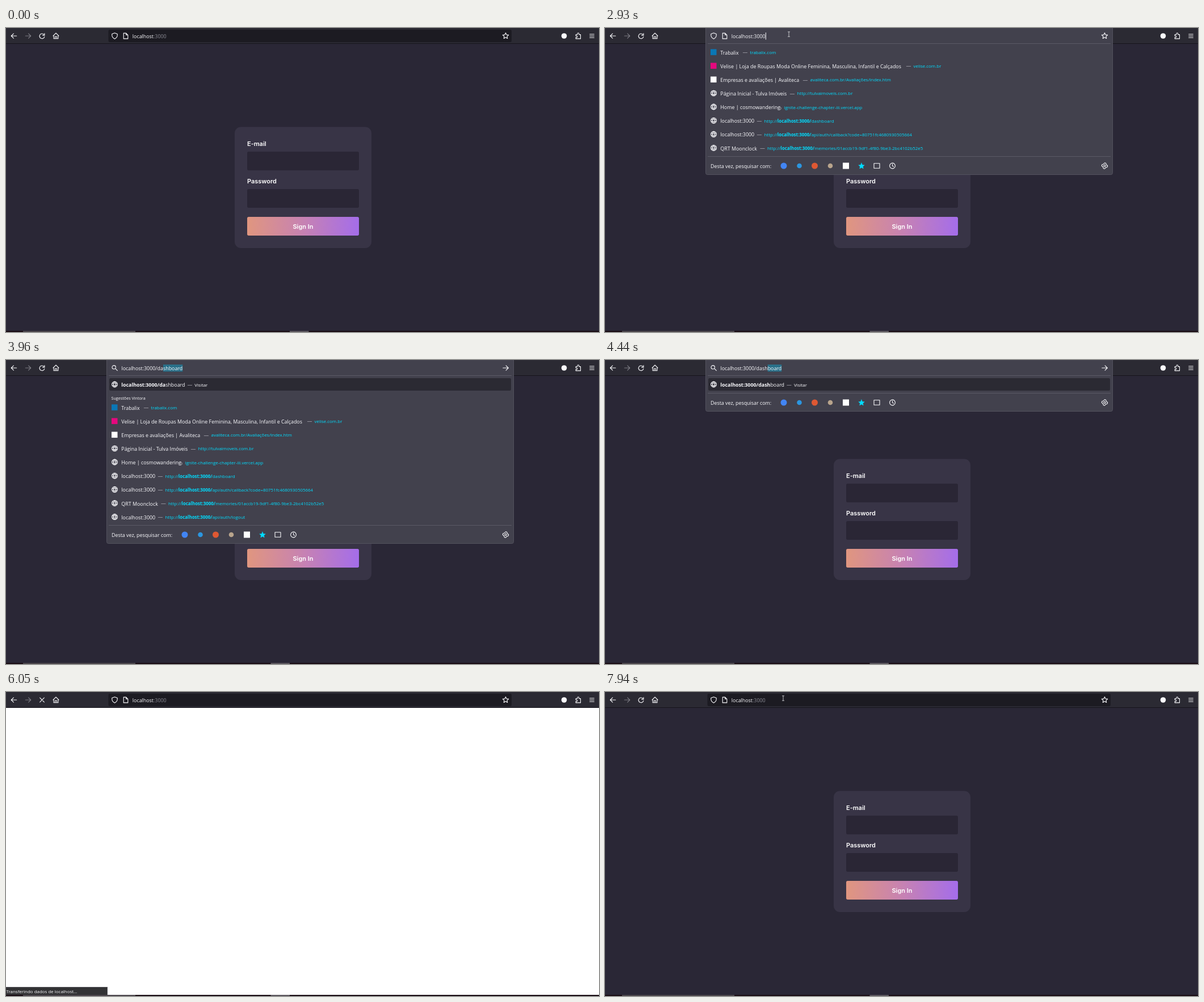
Animation, 1045 px wide and 536 px high, one loop 8000 ms. Source, as an HTML page:

```html
<!DOCTYPE html>
<html lang="pt-BR">
<head>
<meta charset="utf-8">
<title>Sign in</title>
<style>
  html, body { margin: 0; width: 100%; height: 100%; overflow: hidden; background: #2a2736; }
  svg { display: block; }
  text { font: 8.9px "Open Sans", "Noto Sans", sans-serif; fill: #fbfbfe; }
  .small { font-size: 7.95px; }
  .label { font-size: 7.2px; }
  .link { font-size: 7.95px; fill: #00ddff; }
  .dash { fill: #b4b3bb; }
  .dim { fill: #8f8f98; }
  .b { font-weight: 700; }
  .form text { font: 600 10.96px Inter, sans-serif; fill: #fff; }
  .icon { fill: none; stroke: #fbfbfe; stroke-width: 1.1; stroke-linecap: round; stroke-linejoin: round; }
</style>
</head>
<body>
<svg id="stage" width="1045" height="536" viewBox="0 0 1045 536">
  <defs>
    <linearGradient id="warm">
      <stop stop-color="#e0967f"/><stop offset=".5" stop-color="#c782b2"/><stop offset="1" stop-color="#a46dea"/>
    </linearGradient>
  </defs>
  <g id="scene"></g>
</svg>
<script>
const LOOP = 8000;
const scene = document.getElementById('scene');
const ruler = document.createElement('canvas').getContext('2d');
const widthOf = s => {
  ruler.font = '8.9px "Open Sans", "Noto Sans", sans-serif';
  return ruler.measureText(s).width;
};

// markup helpers
const box = (x, y, w, h, fill, r = 0, more = '') =>
  `<rect x="${x}" y="${y}" width="${w}" height="${h}" rx="${r}" fill="${fill}" ${more}/>`;
const text = (x, y, s, cls = '') => `<text x="${x}" y="${y}" class="${cls}">${s}</text>`;
const span = (s, cls, dx = 0) => `<tspan class="${cls}" dx="${dx}">${s}</tspan>`;
const dot = (x, y, r, fill) => `<circle cx="${x}" cy="${y}" r="${r}" fill="${fill}"/>`;
const icon = (x, y, d, more = '') =>
  `<g transform="translate(${x} ${y})"><path class="icon" d="${d}" ${more}/></g>`;
const ring = r => `M${-r} 0a${r} ${r} 0 1 0 ${2 * r} 0a${r} ${r} 0 1 0 ${-2 * r} 0`;
const polar = (n, radius) => 'M' + Array.from({ length: n }, (_, i) => {
  const a = i * 2 * Math.PI / n - Math.PI / 2, r = radius(i);
  return (r * Math.cos(a)).toFixed(2) + ' ' + (r * Math.sin(a)).toFixed(2);
}).join('L') + 'Z';

const ICON = {
  back: 'M4.7 0H-4.7M-.6-4.2L-4.8 0L-.6 4.2',
  go: 'M-4.7 0H4.7M.6-4.2L4.8 0L.6 4.2',
  reload: 'M4.3 1A4.4 4.4 0 1 1 3.2-3M4.4-4.8V-1.4H1',
  stop: 'M-3.8-3.8L3.8 3.8M3.8-3.8L-3.8 3.8',
  home: 'M-5-.2L0-5L5-.2M-3.9-1V4.7H3.9V-1M-1.4 4.5V1H1.4V4.5',
  shield: 'M0-5.2L4.7-3.6V-1Q4.5 3 0 5.2Q-4.5 3-4.7-1V-3.6Z',
  file: 'M-3.8-4.9H.6L3.8-1.7V4.9H-3.8ZM.6-4.7V-1.7H3.6',
  puzzle: 'M-4.3-2.4H-1.6V-3.8A1.4 1.4 0 0 1 1.3-3.8V-2.4H4V4.9H-4.3V2.6H-3A1.3 1.3 0 0 0-3 0H-4.3Z',
  menu: 'M-3.8-3H3.8M-3.8 0H3.8M-3.8 3H3.8',
  search: 'M1.9-1.2A3.2 3.2 0 1 1-4.5-1.2A3.2 3.2 0 1 1 1.9-1.2M1.2 1.2L4.8 4.6',
  globe: ring(4.9) + 'M0-4.9C-3-2-3 2 0 4.9C3 2 3-2 0-4.9M-4.5-1.7H4.5M-4.5 1.7H4.5',
  tab: 'M-5-4.2H5V4.2H-5Z',
  clock: ring(4.9) + 'M0-3V0L2 1.4',
  gear: polar(16, i => i % 4 < 2 ? 5.2 : 3.9) + ring(1.7),
  star: polar(10, i => i % 2 ? 2.6 : 5.5)
};

const HOST = 'localhost:3000';
const local = path => `http://${span(HOST + '/', 'b')}${path}`;
// favicon colour (empty for a globe), title, link position, link
const SITES = [
  ['#0a77b5', 'Trabalix', 255.5, 'trabalix.com'],
  ['#e5087e', 'Velise | Loja de Roupas Moda Online Feminina, Masculina, Infantil e Calçados', 543.5, 'velise.com.br'],
  ['#ffffff', 'Empresas e avaliações | Avaliteca', 361.5, 'avaliteca.com.br/Avaliações/index.htm'],
  ['', 'Página Inicial - Tulva Imóveis', 338.5, 'http://tulvaimoveis.com.br'],
  ['', 'Home | cosmowandering.', 315.5, 'ignite-challenge-chapter-iii.vercel.app'],
  ['', HOST, 280.5, local('dashboard')],
  ['', HOST, 280.5, local('api/auth/callback?code=80751fc4680930505664')],
  ['', 'QRT Moonclock', 286, local('memories/01accb19-9df1-4f80-9be3-2bc4102b52e5')],
  ['', HOST, 280.5, local('api/auth/logout')]
];

function form() {
  const field = y => box(425, y, 197, 33, '#2a2635', 2.7);
  return `<g class="form">${box(403, 174.5, 241, 213.5, '#383446', 11)}
    ${text(425, 208, 'E-mail')}${field(218)}${text(425, 274, 'Password')}${field(284)}
    ${box(425, 333, 197, 33, 'url(#warm)', 2.7)}
    <text x="523.5" y="353.5" text-anchor="middle">Sign In</text></g>`;
}

function siteRows(count, top) {
  return SITES.slice(0, count).map(([tint, title, x, link], i) => {
    const y = top + i * 24.13;
    return (tint ? box(186, y - 5.7, 10.5, 10.5, tint) : icon(191.5, y - .5, ICON.globe)) +
      text(203.3, y + 3.7, title) + text(x - 13, y + 3.3, '—', 'dash') + text(x, y + 3, link, 'link');
  }).join('');
}

function footer(y) {
  return `<path d="M181 ${y - 17}H891" stroke="#5b5a66"/>` + text(186, y + 3.7, 'Desta vez, pesquisar com:') +
    dot(315, y - .5, 5.5, '#4285f4') + dot(342.5, y - .5, 4.3, '#2b96e0') +
    dot(369.5, y - .5, 5.5, '#de5833') + dot(397, y - .5, 4.3, '#b8a48c') +
    box(419, y - 6, 11, 11, '#fff') +
    icon(452, y, ICON.star, 'style="fill:#00ddff;stroke:#00ddff;stroke-width:.5"') +
    icon(479, y - .5, ICON.tab) + icon(506.5, y - .5, ICON.clock) + icon(880.5, y - .5, ICON.gear);
}

function panel(height, content) {
  return box(177.5, -3, 717, height + 2.5, '#42414d', 3, 'stroke="#53525e"') +
    (content ? '<path d="M181 27.5H891" stroke="#5b5a66"/>' + content + footer(height - 15.5) : '');
}

function visitRow(bold, rest) {
  return box(182, 32, 708, 22, '#2b2a33', 2.5) + icon(191.5, 43, ICON.globe) +
    `<text x="203.3" y="46.5">${span(bold, 'b')}${span(rest, '')}${span('—', 'dash', 4)}${span('Visitar', 'small', 4)}</text>`;
}

// editable address: typed part, highlighted part, optional caret
function entry(x, typed, marked, caret) {
  const end = x + widthOf(typed);
  return (marked ? box(end, 8, widthOf(marked), 12.5, '#2a7089') : '') + text(x, 18, typed + marked) +
    (caret ? box(end + .2, 8, 1, 12.5, '#fbfbfe') : '');
}

function addressBar(t) {
  const page = icon(191.5, 14, ICON.shield) + icon(211, 14, ICON.file) + icon(880.5, 14, ICON.star);
  if (t < 2200 || t >= 5910)
    return box(180.5, 3, 710.5, 22, '#1c1b22', 2.7) + page +
      `<text x="222.8" y="18">localhost${span(':3000', 'dim')}</text>`;
  if (t >= 5770)
    return box(180.5, 3, 710.5, 22, '#42414d', 2.7) + page +
      entry(222.8, HOST + (t < 5840 ? '/dashboard' : ''), '', true);

  const top = siteRows(8, 43);
  if (t < 3540) {
    const open = t < 2930;
    return panel(t < 2270 ? 28 : 259, t < 2270 ? '' : top) + page +
      entry(222.8, open ? '' : HOST, open ? HOST : '', !open && t < 3280);
  }

  const lettersAt = (...times) => times.filter(at => t >= at).length;
  const typed = lettersAt(3750, 3890, 4090, 4370);
  const shown = lettersAt(3820, 3960, 4160, 4440);
  const word = 'dashboard', path = HOST + '/';
  const visit = visitRow(path + word.slice(0, shown), shown ? word.slice(shown) : '');
  const list = t < 3610 ? panel(259, top)
    : t < 4020 ? panel(324, visit + text(185.5, 69.5, 'Sugestões Vintora', 'label') + siteRows(9, 84))
    : panel(91, visit);
  return list + icon(191.5, 14, ICON.search) + icon(880.5, 14, ICON.go) +
    entry(203.5, path + word.slice(0, typed), typed ? word.slice(typed) : '', !typed);
}

function reloadIcon(t) {
  if (t >= 5980 && t < 6670) return icon(63.5, 14, ICON.stop);
  let turn = 0;
  if (t >= 5770 && t < 5980) turn = (t - 5770) * 1.6;
  if (t >= 6670 && t < 7010) turn = (t - 7010) * .5;
  const dim = t >= 6670 && t < 7270 ? 'opacity=".4"' : '';
  return icon(63.5, 14.3, ICON.reload, `transform="rotate(${turn.toFixed(0)})" ${dim}`);
}

function toolbar(t) {
  return box(0, 0, 1045, 27, '#2b2a33') + box(0, 27, 1045, 1, '#15141b') +
    icon(14, 14, ICON.back) + icon(39, 14, ICON.go, 'opacity=".4"') + reloadIcon(t) +
    icon(88, 14, ICON.home) + dot(983.5, 14, 4.8, '#fbfbfe') +
    icon(1008.5, 14, ICON.puzzle) + icon(1032.5, 14, ICON.menu);
}

function status(t) {
  if (t < 5840 || t >= 6940) return '';
  return box(-.5, 520.5, 179, 14, '#323234', 0, 'stroke="#55555a"') +
    text(.5, 531, t < 6050 ? 'localhost' : 'Transferindo dados de localhost…', 'small');
}

const PATHS = [
  [[720, 1012, 532], [1169, 1012, 532], [1170, 490, 128], [1215, 328, 110], [1260, 331, 147],
   [1550, 331, 147], [1870, 324, 11], [3540, 324, 11]],
  [[7730, 321, 8], [7940, 314, 11], [LOOP, 314, 11]]
];

function pointer(t) {
  const path = PATHS.find(p => t >= p[0][0] && t < p[p.length - 1][0]);
  if (!path) return '';
  const i = path.findIndex(p => p[0] > t);
  const [t0, x0, y0] = path[i - 1], [t1, x1, y1] = path[i];
  const k = (t - t0) / (t1 - t0), x = x0 + (x1 - x0) * k, y = y0 + (y1 - y0) * k;
  const shape = y < 27
    ? '<path d="M-2-4.2H2M0-4.2V4.2M-2 4.2H2" stroke="#d0d0d4" stroke-width=".9"/>'
    : '<path d="M0 0V10.5L2.5 8.2L4.1 11.8L5.6 11.1L4 7.6H7.4Z" fill="#fff" stroke="#000" stroke-width=".7"/>';
  return `<g transform="translate(${x.toFixed(1)} ${y.toFixed(1)})">${shape}</g>`;
}

function draw(t) {
  const blank = t >= 6050 && t < 6670;
  return box(0, 0, 1045, 536, blank ? '#fff' : '#2a2736') + (blank ? '' : form()) +
    toolbar(t) + addressBar(t) + status(t) +
    box(0, 534, 1045, 2, '#190c13') + box(30, 534, 198, 2, '#4b454b') +
    box(t < 2200 ? 500 : 466.5, 534, 33.5, 2, '#5a555c') + pointer(t);
}

let last = '';
function tick() {
  const markup = draw(performance.now() % LOOP);
  if (markup !== last) scene.innerHTML = last = markup;
  requestAnimationFrame(tick);
}
tick();
</script>
</body>
</html>
```
